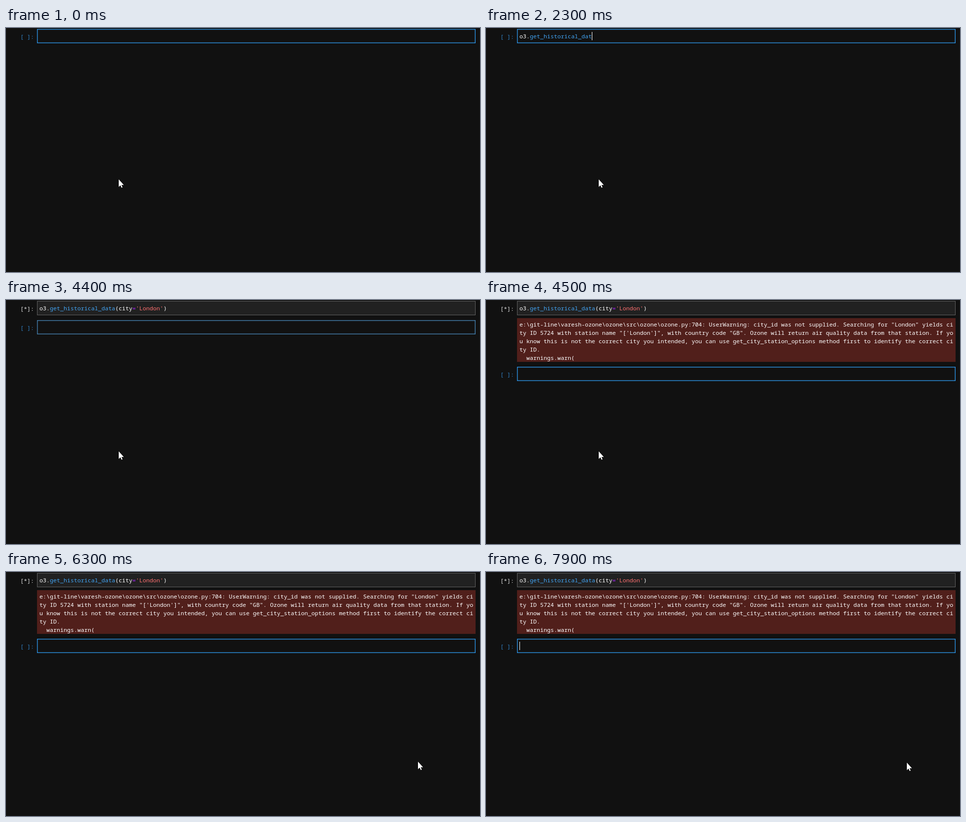
Animation of 963 by 497 pixels, one loop 8 s. Source, as an HTML page:

```html
<!DOCTYPE html>
<html lang="en">
<head>
<meta charset="utf-8">
<title>Notebook cell</title>
<style>
html, body { margin: 0; width: 963px; height: 497px; overflow: hidden; background: #111; }
body { position: relative; font: 11.667px/17px "Noto Sans Mono", monospace; color: #fff; }
div, pre, svg { position: absolute; margin: 0; font: inherit; white-space: pre; }
.cell { left: 0; width: 963px; height: 29px; }
.prompt { left: 29px; top: 7px; color: #e0e0e0; }
.box { left: 63px; top: 0; width: 891px; height: 29px; box-sizing: border-box; padding: 5px 4px;
  background: #212121; border: 1px solid #616161; }
.active .prompt { color: #307fc1; }
.active .box { background: #111; border-color: #2196f3; box-shadow: inset 0 0 2px #64b5f6; }
.fading .box { border-color: #417caa; }
.caret { top: 6px; width: 1px; height: 17px; background: #fff; }
#warning { left: 63px; top: 37px; width: 886px; height: 85px; padding: 4px 0 0 5px; background: #511f1b; }
.prop { color: #42a5f5; }
.op { color: #a2f; }
.str { color: #ff7070; }
.match { color: #0b0; }
</style>
</head>
<body>
<div class="cell" id="first" style="top:2px">
  <div class="prompt"></div><div class="box"></div><div class="caret"></div>
</div>
<pre id="warning">e:\git-line\varesh-ozone\ozone\src\ozone\ozone.py:704: UserWarning: city_id was not supplied. Searching for "London" yields ci
ty ID 5724 with station name "['London']", with country code "GB". Ozone will return air quality data from that station. If yo
u know this is not the correct city you intended, you can use get_city_station_options method first to identify the correct ci
ty ID.
  warnings.warn(</pre>
<div class="cell active" id="second">
  <div class="prompt">[ ]:</div><div class="box"></div><div class="caret" style="left:68px"></div>
</div>
<svg id="pointer" width="14" height="21" viewBox="-1 -1 14 21">
  <path d="M1 .3V15.8L4.4 12.6L6.8 17.4L8.8 16.5L6.6 11.8H11.4Z" fill="#fff" stroke="#000" paint-order="stroke"/>
</svg>
<script>
const LOOP = 8000, RUN = 4400, OUTPUT = 4500, BLINK = 530;
const CODE = "o3.get_historical_data(city='London')";
// time, x, y of the pointer tip
const PATH = [
  [5000, 228, 308], [5100, 262, 307], [5400, 585, 303], [5500, 690, 314], [5700, 810, 344],
  [6000, 841, 372], [6300, 836, 386], [6500, 868, 397], [6800, 951, 386], [7000, 908, 367],
  [7200, 874, 386], [7500, 886, 422], [7700, 914, 406], [7900, 854, 388]
];
const first = document.getElementById("first"), second = document.getElementById("second");
const warning = document.getElementById("warning"), pointer = document.getElementById("pointer");
const part = (cell, name) => cell.querySelector("." + name);
const show = (el, on) => { el.style.visibility = on ? "visible" : "hidden"; };

// One key per 100 ms, with one missed beat before the opening bracket
function typedCount(t) {
  const n = t / 100 - 2;
  return Math.max(0, Math.min(CODE.length, n > 22 ? n - 1 : n));
}

// Typed text plus the closing quote and bracket the editor adds
function codeAt(n) {
  return CODE.slice(0, n) + (n > 28 && n < 36 ? "'" : "") + (n > 22 && n < 37 ? ")" : "");
}

function colour(text, matched) {
  return text.replace(/(?<=\.)\w+|[()]|=|'.*'/g, s => {
    const name = s === "=" ? "op" : s[0] === "'" ? "str" : /\w/.test(s) ? "prop" : matched ? "match" : "";
    return `<span class="${name}">${s}</span>`;
  });
}

function pointerAt(t) {
  const i = PATH.findIndex(p => p[0] > t);
  if (i <= 0) return (i ? PATH[PATH.length - 1] : PATH[0]).slice(1);
  const [a, b] = [PATH[i - 1], PATH[i]], k = (t - a[0]) / (b[0] - a[0]);
  return [1, 2].map(j => Math.round(a[j] + (b[j] - a[j]) * k));
}

function draw(t) {
  const n = typedCount(t), running = t >= RUN, done = t >= OUTPUT;
  const matched = !running && n > 22 && (n < 29 || n > 35);
  first.classList.toggle("active", !running);
  part(first, "prompt").textContent = running ? "[*]:" : "[ ]:";
  part(first, "box").innerHTML = colour(codeAt(n), matched);
  part(first, "caret").style.left = 68 + 7 * n + "px";
  show(part(first, "caret"), t >= 100 && !running);

  show(warning, done);
  show(second, running);
  second.style.top = (done ? 136 : 41) + "px";
  second.classList.toggle("fading", !done);
  show(part(second, "caret"), t >= 4600 && Math.floor((t - 4600) / BLINK) % 2 === 0);

  const [x, y] = pointerAt(t);
  pointer.style.left = x - 1 + "px";
  pointer.style.top = y - 1 + "px";
}

const start = performance.now();
let last = -1;
function tick() {
  const t = Math.floor((performance.now() - start) % LOOP / 100) * 100;
  if (t !== last) draw(last = t);
  requestAnimationFrame(tick);
}
tick();
</script>
</body>
</html>
```
